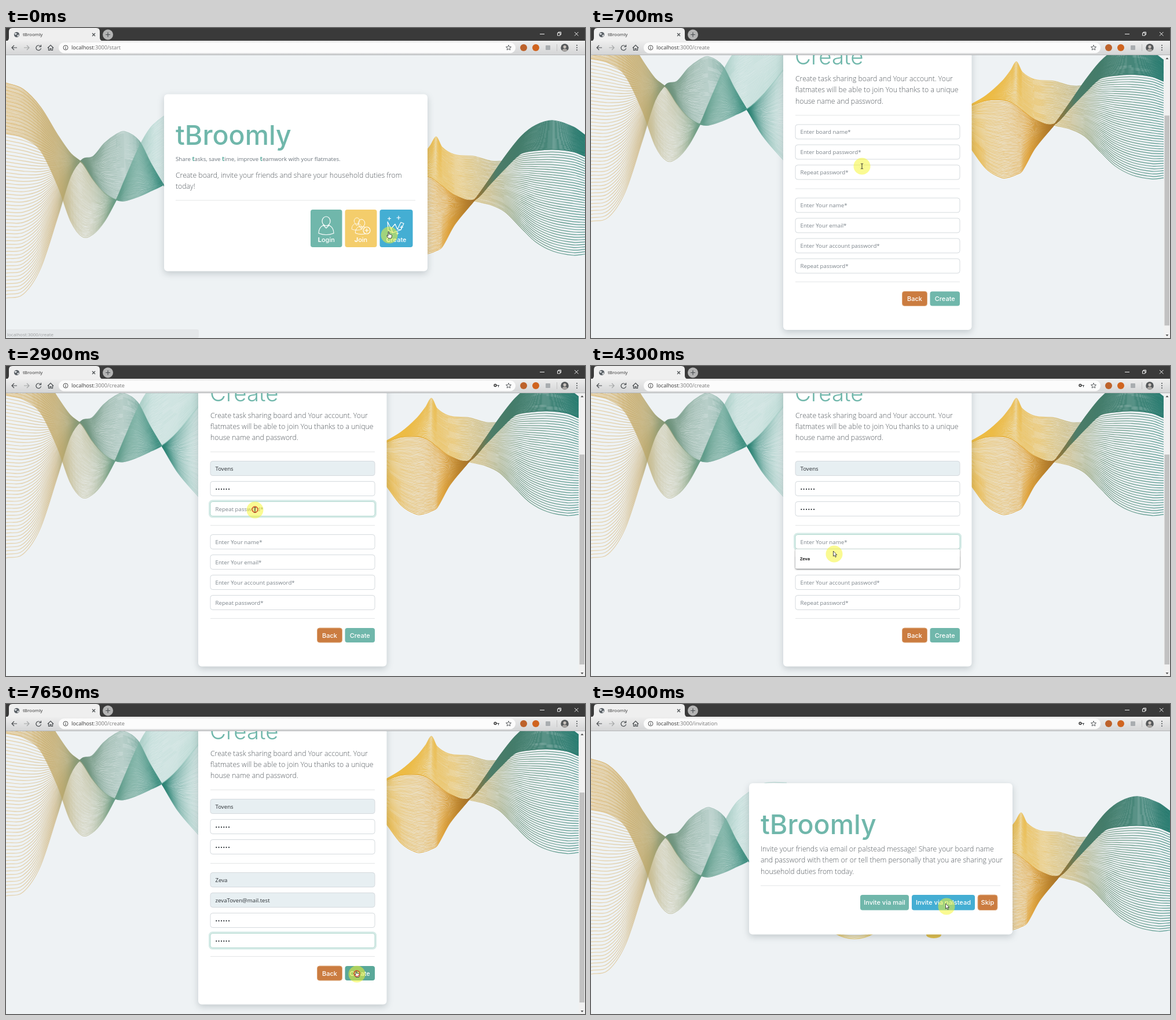
Animation of 1000x536 px, one loop 9800 ms. Source, as an HTML page:

```html
<!DOCTYPE html>
<html lang="en">
<head>
<meta charset="utf-8">
<title>tBroomly</title>
<style>
  html, body { margin: 0; width: 100%; height: 100%; overflow: hidden; background: #eef2f4; }
  svg { display: block; width: 100vw; height: 100vh; }
  text { font-family: "Open Sans", "Noto Sans", sans-serif; white-space: pre; }
  .title { font: 500 46.5px Inter, sans-serif; fill: #70b7ab; }
  .title.thin { font-weight: 300; font-size: 38.5px; }
  .lead { font-size: 12.25px; font-weight: 300; fill: #555b60; }
  .tag { font-size: 9.7px; fill: #6c757d; }
  .tag tspan { font-weight: 700; fill: #57a99b; }
  .btn { font: 500 11px Inter, sans-serif; fill: #fff; text-anchor: middle; }
  .field { font-size: 9.7px; }
  .option { font-size: 7.4px; font-weight: 700; fill: #222; }
  .ui { font-size: 8px; fill: #333; }
  .url { font-size: 9.2px; fill: #777; }
  .line { fill: none; stroke-width: 1.2; }
  .icon { fill: none; stroke: #fff; stroke-width: 1.2; stroke-linejoin: round; stroke-linecap: round; }
  .tool { fill: none; stroke: #4b4f52; stroke-width: 1.2; }
  .shadow { filter: drop-shadow(0 4px 6px rgba(60, 75, 85, .24)); }
</style>
</head>
<body>
<svg id="stage" viewBox="0 0 1000 536" preserveAspectRatio="none">
  <defs>
    <linearGradient id="tan" gradientUnits="userSpaceOnUse" x1="0" x2="340" y1="0" y2="0">
      <stop offset="0" stop-color="#e2bd78"/><stop offset=".25" stop-color="#c9ae74"/>
      <stop offset=".38" stop-color="#6f917a"/><stop offset=".6" stop-color="#5f9583"/>
      <stop offset=".79" stop-color="#1f7a6b"/><stop offset="1" stop-color="#a3cfc5"/>
    </linearGradient>
    <linearGradient id="mist" gradientUnits="userSpaceOnUse" x1="0" x2="340" y1="0" y2="0">
      <stop offset="0" stop-color="#d9a546"/><stop offset=".24" stop-color="#bfa45f"/>
      <stop offset=".42" stop-color="#a9a878"/><stop offset=".58" stop-color="#5f9b8a"/>
      <stop offset=".75" stop-color="#8fc6ba"/><stop offset="1" stop-color="#9fcdc3"/>
    </linearGradient>
    <linearGradient id="gold" gradientUnits="userSpaceOnUse" x1="660" x2="1000" y1="0" y2="0">
      <stop offset="0" stop-color="#eebd45"/><stop offset=".36" stop-color="#e8b53f"/>
      <stop offset=".52" stop-color="#b9a55c"/><stop offset=".7" stop-color="#5c8b72"/>
      <stop offset="1" stop-color="#2c8276"/>
    </linearGradient>
    <linearGradient id="amber" gradientUnits="userSpaceOnUse" x1="660" x2="1000" y1="0" y2="0">
      <stop offset="0" stop-color="#e9b436"/><stop offset=".3" stop-color="#de9c2b"/>
      <stop offset=".43" stop-color="#a8752c"/><stop offset=".55" stop-color="#4d7c68"/>
      <stop offset="1" stop-color="#1e7569"/>
    </linearGradient>
    <linearGradient id="bar" x2="0" y2="1">
      <stop offset="0" stop-color="#eeeeee"/><stop offset="1" stop-color="#d3d4d5"/>
    </linearGradient>
  </defs>
</svg>
<script>
const LOOP = 9800, MAX_SCROLL = 133;
const stage = document.getElementById('stage');
const TEAL = '#70b7ab', BLUE = '#44aed3', RUST = '#cb7c40';

function add(parent, tag, attrs = {}, html = '') {
  const node = document.createElementNS('http://www.w3.org/2000/svg', tag);
  for (const key in attrs) node.setAttribute(key, attrs[key]);
  node.innerHTML = html;
  parent.append(node);
  return node;
}
const group = (parent = stage) => add(parent, 'g');
const box = (p, x, y, width, height, rx, fill, more) =>
  add(p, 'rect', { x, y, width, height, rx, fill, ...more });
const label = (p, x, y, cls, html, more) => add(p, 'text', { x, y, class: cls, ...more }, html);
const path = (p, d, cls, more) => add(p, 'path', { d, class: cls, ...more });
const disc = (p, cx, cy, r, fill, more) => add(p, 'circle', { cx, cy, r, fill, ...more });
const show = (node, on) => { node.style.display = on ? '' : 'none'; };
const rule = (p, x1, x2, y) => path(p, `M${x1} ${y}H${x2}`, '', { stroke: '#e3e5e6' });

// Smooth curve through (xs, ys) with finite-difference tangents.
function curve(xs, ys) {
  const last = xs.length - 1;
  const slope = i => {
    const a = Math.max(0, i - 1), b = Math.min(last, i + 1);
    return (ys[b] - ys[a]) / (xs[b] - xs[a]);
  };
  let d = `M${xs[0]} ${ys[0]}`;
  for (let i = 0; i < last; i++) {
    const h = (xs[i + 1] - xs[i]) / 3;
    d += `C${xs[i] + h} ${ys[i] + slope(i) * h} ${xs[i + 1] - h} ${ys[i + 1] - slope(i + 1) * h} ${xs[i + 1]} ${ys[i + 1]}`;
  }
  return d;
}
function ribbon(parent, xs, from, to, count, paint, opacity) {
  for (let i = 0; i <= count; i++) {
    const ys = from.map((y, k) => y + (to[k] - y) * i / count);
    path(parent, curve(xs, ys), 'line', { stroke: `url(#${paint})`, opacity });
  }
}

box(stage, 0, 0, 1000, 536, 0, '#eef2f4');
const waves = group();
const leftX = [0, 30, 60, 90, 112, 132, 150, 170, 190, 205, 230, 250, 272, 300, 338];
const fold = [183, 190, 213, 275, 335, 361, 357, 335, 298, 262, 205, 172, 153, 137, 136];
const ridge = [95, 106, 137, 186, 217, 234, 262, 285, 297, 299, 291, 282, 271, 246, 200];
const sweep = [467, 460, 415, 325, 256, 227, 222, 199, 184, 179, 195, 233, 271, 318, 362];
ribbon(waves, leftX, ridge, sweep, 60, 'tan', .6);
ribbon(waves, leftX, fold, ridge, 48, 'mist', .55);

const rightX = [662, 690, 718, 733, 743, 753, 775, 809, 838, 862, 890, 915, 945, 980, 1000];
const crest = [264, 247, 222, 203, 188, 206, 219, 222, 230, 229, 217, 212, 210, 214, 222];
const belly = [265, 256, 255, 259, 265, 273, 289, 299, 306, 318, 346, 370, 386, 393, 391];
const swell = [338, 375, 391, 389, 385, 379, 340, 298, 257, 222, 187, 168, 160, 171, 185];
const core = [...belly.slice(0, 7), 297, 268, 243, ...crest.slice(10)];
ribbon(waves, rightX, crest, belly, 40, 'gold', .8);
ribbon(waves, rightX, core, swell, 50, 'amber', .85);
for (const dip of [6, 11, 16])
  path(waves, `M420 396Q455 ${400 + dip} 490 396`, 'line', { stroke: '#e8c65e' });
add(waves, 'ellipse', { cx: 592, cy: 399, rx: 13, ry: 6, fill: '#e3c049' });

const card = (p, x, y, w, h) => box(p, x, y, w, h, 6, '#fff', { class: 'shadow' });
const lead = (p, x, y, lines) => lines.forEach((s, i) => label(p, x, y + i * 19.4, 'lead', s));
function button(p, x, y, w, h, fill, text, baseline) {
  const face = box(p, x, y, w, h, 4, fill);
  label(p, x + w / 2, baseline, 'btn', text);
  return face;
}
const bold = s => `<tspan font-weight="700">${s[0]}</tspan>${s.slice(1)}`;

// Welcome page
const start = group();
card(start, 273, 114.5, 455, 306);
label(start, 293, 202, 'title', 'tBroomly');
label(start, 293, 230, 'tag', 'Share <tspan>t</tspan>asks, save <tspan>t</tspan>ime, improve <tspan>t</tspan>eamwork with your flatmates.');
lead(start, 293, 259, ['Create board, invite your friends and share your household duties from', 'today!']);
rule(start, 293, 707, 298);
button(start, 526, 314, 54.5, 65, TEAL, bold('Login'), 369.5);
button(start, 585.5, 314, 55, 65, '#f4cd6b', bold('Join'), 369.5);
button(start, 645.5, 314, 57, 65, BLUE, bold('Create'), 369.5);
const person = (x, y, s) => path(start,
  'M-7 -8a7 8 0 1 1 14 0a7 8 0 1 1 -14 0M-5 -1C-11 2 -13 7 -13 13Q0 18 13 13C13 7 11 2 5 -1L0 4Z',
  'icon', { transform: `translate(${x} ${y}) scale(${s})` });
person(553, 342, 1);
person(606, 339, .68);
person(614, 344, .82);
disc(start, 623, 350, 6, '#f4cd6b', { stroke: '#fff', 'stroke-width': 1.2 });
path(start, 'M620 350h6M623 347v6', 'icon');
path(start, 'M659 335l6 12 7 -8 4 9 6 -12 5 2M659 335l1 15 8 4 14 -5 5 -11M665 347l3 7M676 348l6 1', 'icon');
path(start, 'M662 327v5M659.500 329.500h5M678 325v6M675 328h6M683 342v5M680.500 344.500h5M676 353v4M674 355h4', 'icon');
const hint = group(start);
box(hint, 0, 521, 333, 15, 3, '#e4e7e9');
label(hint, 2, 532.5, 'ui', 'localhost:3000/create', { 'fill-opacity': .4 });

// Sign-up page, laid out at the end of its scroll
const create = group();
card(create, 332, -24, 325.5, 543.5);
label(create, 352, 61, 'title thin', 'Create');
lead(create, 353, 89.5, ['Create task sharing board and Your account. Your', 'flatmates will be able to join You thanks to a unique', 'house name and password.']);
[148.5, 275.5, 436.5].forEach(y => rule(create, 353, 637, y));
const back = button(create, 537.5, 453, 43, 25, RUST, 'Back', 469.5);
back.setAttribute('stroke', '#dca577');
const submit = button(create, 585.5, 453, 51.5, 25, TEAL, 'Create', 469.5);

// value + pick: chosen from a suggestion; typed: six hidden characters
const fields = [
  { y: 164.5, hint: 'Enter board name*', value: 'Tovens', focus: 1000, pick: 1500, blur: 1900 },
  { y: 199.5, hint: 'Enter board password*', focus: 1900, typed: 2100, blur: 2900 },
  { y: 234.5, hint: 'Repeat password*', focus: 2900, typed: 3050, blur: 4050 },
  { y: 291.5, hint: 'Enter Your name*', value: 'Zeva', focus: 4050, pick: 4450, blur: 4700 },
  { y: 326.5, hint: 'Enter Your email*', value: 'zevaToven@mail.test', focus: 4700, pick: 5150, blur: 5580 },
  { y: 361.5, hint: 'Enter Your account password*', focus: 5580, typed: 5700, blur: 6600 },
  { y: 396.5, hint: 'Repeat password*', focus: 6600, typed: 6700, blur: LOOP }
];
for (const f of fields) {
  f.ring = box(create, 351.5, f.y - 1.5, 287, 28, 5, 'none', { stroke: '#d6ebe7', 'stroke-width': 3 });
  f.frame = box(create, 353, f.y, 284, 25, 4, '#fff');
  f.text = label(create, 361.5, f.y + 16.5, 'field', f.hint);
  f.squiggle = path(create, '', '', { stroke: '#e0443e', 'stroke-dasharray': '2 1', fill: 'none' });
  f.caret = path(create, '', '', { stroke: '#222', 'stroke-width': 1 });
}
for (const f of fields.filter(f => f.pick)) {
  f.list = group(create);
  box(f.list, 353, f.y + 25, 284, 34, 2, '#fff', { style: 'filter:drop-shadow(0 1px 1.500px rgba(0,0,0,.5))' });
  label(f.list, 361, f.y + 44, 'option', f.value);
}

// Invitation page
const invite = group();
card(invite, 273, 137, 455, 261.5);
label(invite, 293, 225, 'title', 'tBroomly');
lead(invite, 293, 255, ['Invite your friends via email or palstead message! Share your board name', 'and password with them or or tell them personally that you are sharing your', 'household duties from today.']);
rule(invite, 293, 707, 314);
button(invite, 465, 330, 84, 26.5, TEAL, 'Invite via mail', 347);
button(invite, 554, 330, 109, 26.5, BLUE, 'Invite via palstead', 347);
button(invite, 668, 330, 34, 26.5, RUST, 'Skip', 347).setAttribute('stroke', '#e3b48c');

// Scrollbar
const scrollbar = group();
box(scrollbar, 989, 47, 11, 489, 0, '#f1f1f1');
const thumb = box(scrollbar, 990.5, 60, 8.5, 363, 0, '#c1c1c1');
path(scrollbar, 'M992.500 54l2.500 -3 2.500 3zM992.500 530l2.500 3 2.500 -3z', '', { fill: '#505050' });

// Browser frame
const chrome = group();
box(chrome, 0, 0, 1000, 23, 0, '#3a3a3a');
path(chrome, 'M0 23Q5 22 5 17V6Q5 0 11 0H156Q162 0 162 6V17Q162 22 168 23Z', '', { fill: '#efefef' });
box(chrome, 0, 22, 1000, 25, 0, 'url(#bar)');
path(chrome, 'M0 46.500H1000', '', { stroke: '#b4b6b8' });
disc(chrome, 18.5, 11.5, 4.6, '#5a6066');
path(chrome, 'M15 9q3 -1 4 1l-2 2 -2 -1zM19 13l3 -2v3l-2 1z', '', { fill: '#dfe2e4' });
label(chrome, 29, 14, 'ui', 'tBroomly');
path(chrome, 'M149 9l5 5M154 9l-5 5', 'tool');
disc(chrome, 176, 11.5, 9, '#b4b4b4');
path(chrome, 'M172 11.500h8M176 7.500v8', 'tool');
path(chrome, 'M922 10.500h8M952.500 8.500h4.500v4.500h-4.500zM954 8.500v-1.500h4.500v4.500h-1.500M982 7l6.500 6.500M988.500 7l-6.500 6.500', 'tool', { style: 'stroke:#eee;stroke-width:1' });
path(chrome, 'M19 34h-9M14 30l-4 4 4 4', 'tool');
path(chrome, 'M31 34h9M36 30l4 4 -4 4', 'tool', { opacity: .4 });
path(chrome, 'M59.500 31.500a4.300 4.300 0 1 0 1 3.500M60.500 29v3.500h-3.500', 'tool');
path(chrome, 'M72 34.500l5 -5 5 5M73.500 33.500v5h2.500v-3h2v3h2.500v-5', 'tool');
box(chrome, 91, 25, 789, 18.5, 9.2, '#fcfcfc');
disc(chrome, 103, 34, 4, 'none', { stroke: '#555' });
path(chrome, 'M103 33.500v3M103 31.500v1', 'tool');
const url = label(chrome, 113, 37.3, 'url', '');
const key = group(chrome);
disc(key, 845, 33.5, 1.9, 'none', { stroke: '#444', 'stroke-width': 1.6 });
path(key, 'M847 33.500h5M850.500 34v2.500', 'tool', { 'stroke-width': 1.6 });
path(chrome, 'M868 29.500l1.300 3 3.200 .2 -2.500 2.100 .8 3.200 -2.800 -1.700 -2.800 1.700 .8 -3.200 -2.500 -2.100 3.200 -.2z', 'tool', { style: 'stroke-width:.9' });
disc(chrome, 894, 34, 6, '#bd622b');
disc(chrome, 915, 34, 6, '#d0641f');
box(chrome, 932, 30, 8, 8, 1, '#a9adb0');
path(chrome, 'M951.500 28v12', '', { stroke: '#c2c2c2' });
disc(chrome, 965, 34, 6.8, '#55585a');
disc(chrome, 965, 32.5, 2.6, '#c9c2bd');
path(chrome, 'M960 38.500q5 -6 10 0q-5 4 -10 0z', '', { fill: '#a8a4a1' });
[30, 34, 38].forEach(y => disc(chrome, 986, y, 1, '#4b4f52'));

// Pointer
const pointer = group();
disc(pointer, 0, 0, 14.5, '#f6f52e', { opacity: .52 });
const outline = { stroke: '#222', 'stroke-width': .8, fill: '#fff' };
const shapes = {
  arrow: path(pointer, 'M-1.500 -5v9l2 -1.800 1.500 3.300 1.500 -.7 -1.500 -3.200h2.800z', '', outline),
  hand: path(pointer, 'M-2 -5.500q1.200 -1 1.600 .3v3.700l3.600 .7q1.500 .5 1.300 2l-1 4.300h-5l-2.800 -4q-.2 -1.600 1.300 -.8l1 .8z', '', outline),
  beam: path(pointer, 'M-2 -4.500q1.500 0 2 .8q.5 -.8 2 -.8M0 -4v8M-2 4.500q1.500 0 2 -.8q.5 .8 2 .8', '', { stroke: '#333', fill: 'none' })
};
const click = disc(pointer, 0, -1, 5, 'none', { stroke: '#d4502a', 'stroke-width': 1.6 });

const route = [
  [0, 662, 358], [200, 662, 358], [450, 560, 310], [700, 468, 239], [1000, 425, 179], [1150, 425, 179],
  [1450, 433, 206], [1900, 433, 210], [2600, 433, 210], [2900, 430, 249], [3500, 430, 249],
  [3950, 429, 303], [4080, 429, 303], [4300, 420, 325], [4450, 417, 332], [4680, 416, 340],
  [4800, 416, 340], [5050, 416, 368], [5450, 416, 373], [6050, 416, 373], [6300, 424, 322],
  [6550, 430, 408], [7100, 430, 408], [7500, 606, 467], [8900, 606, 467], [9350, 614, 350], [LOOP, 614, 350]
];
const looks = [[0, 'hand'], [250, 'arrow'], [560, 'beam'], [1200, 'arrow'], [1600, 'beam'], [4150, 'arrow'],
  [4550, 'beam'], [4850, 'arrow'], [5250, 'beam'], [7250, 'arrow'], [7450, 'hand'], [8200, 'arrow']];
const clicks = [100, 1000, 1480, 1880, 2880, 4040, 4430, 4690, 5140, 5470, 6580, 7620];

function locate(t) {
  const i = Math.max(1, route.findIndex(k => k[0] > t));
  const [t0, x0, y0] = route[i - 1], [t1, x1, y1] = route[i];
  const p = (t - t0) / (t1 - t0), e = p * p * (3 - 2 * p);
  return [x0 + (x1 - x0) * e, y0 + (y1 - y0) * e];
}

function drawField(f, t) {
  const focused = t >= f.focus && t < f.blur;
  const picked = f.pick && t >= f.pick;
  const dots = f.typed ? Math.max(0, Math.min(6, Math.floor((t - f.typed) / 75) + 1)) : 0;
  const content = picked ? f.value : '•'.repeat(dots);
  const shown = content || f.hint;
  if (f.text.textContent !== shown) f.text.textContent = shown;
  f.text.setAttribute('fill', content ? '#2b3035' : '#7c848b');
  f.text.setAttribute('letter-spacing', dots ? .7 : 0);
  f.frame.setAttribute('fill', picked ? '#e7eff2' : '#fff');
  f.frame.setAttribute('stroke', focused ? '#b4dad1' : '#d5dade');
  show(f.ring, focused);
  const end = 361.5 + (content ? f.text.getComputedTextLength() : 0);
  f.caret.setAttribute('d', `M${end + .5} ${f.y + 6}v13`);
  const edited = picked ? f.pick : f.typed + 75 * (dots - 1);
  show(f.caret, focused && content && (t - edited) % 1000 < 500);
  f.squiggle.setAttribute('d', `M361.500 ${f.y + 18.5}H${end}`);
  show(f.squiggle, focused && picked);
  if (f.list) show(f.list, focused && !picked && t > f.focus + 100);
}

function render(t) {
  const page = t < 250 ? 'start' : t < 8200 ? 'create' : 'invitation';
  const onCreate = page === 'create';
  const p = Math.max(0, Math.min(1, (t - 350) / 477));
  const scroll = MAX_SCROLL * (1 - (1 - p) ** 3);
  show(start, page === 'start');
  show(create, onCreate);
  show(scrollbar, onCreate);
  show(invite, page === 'invitation');
  show(hint, t < 150);
  show(key, t >= 2150);
  const address = `<tspan fill="#333">localhost</tspan>:3000/${page}`;
  if (url.dataset.page !== page) { url.dataset.page = page; url.innerHTML = address; }
  waves.setAttribute('transform', onCreate ? `translate(0 ${3 - scroll}) scale(.989)` : '');
  if (onCreate) {
    create.setAttribute('transform', `translate(0 ${MAX_SCROLL - scroll})`);
    thumb.setAttribute('y', 60 + scroll * .7);
    submit.setAttribute('fill', t > 7450 ? '#5aa899' : TEAL);
    fields.forEach(f => drawField(f, t));
  }
  pointer.setAttribute('transform', `translate(${locate(t)})`);
  const look = looks.filter(k => k[0] <= t).pop()[1];
  for (const name in shapes) show(shapes[name], name === look);
  show(click, clicks.some(c => t >= c && t < c + 130));
}

function tick() {
  render(performance.now() % LOOP);
  requestAnimationFrame(tick);
}
tick();
</script>
</body>
</html>
```
